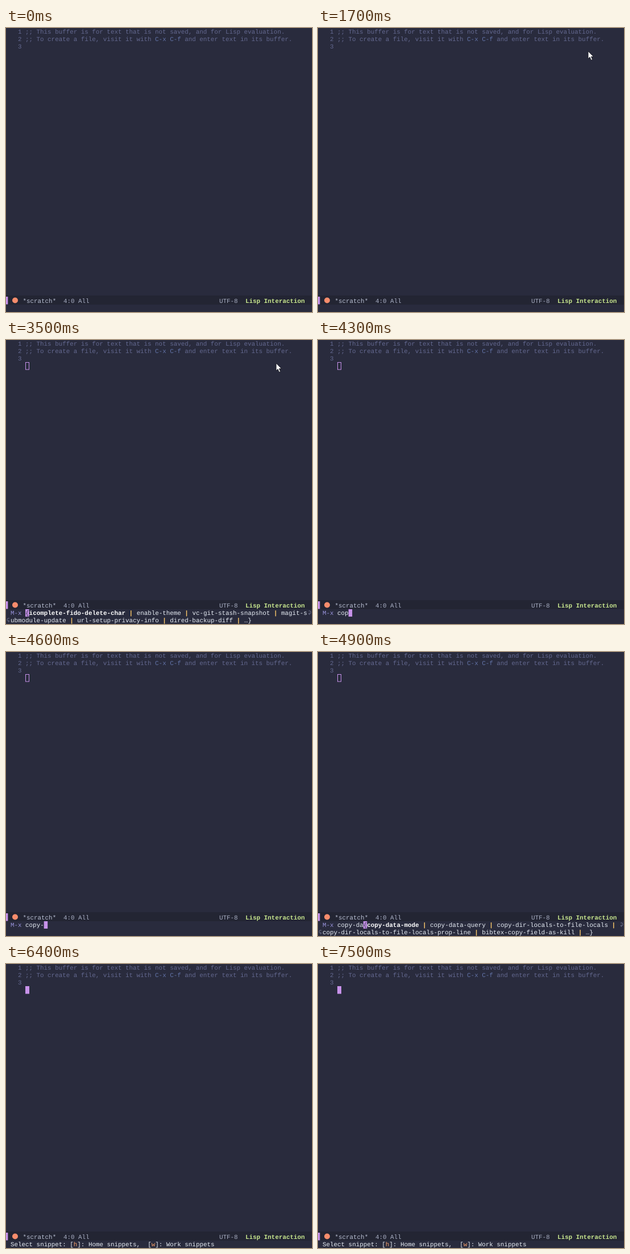
Recreate the animation shown at these times as an HTML page. Size 538 px wide and 500 px high, loop 8000 ms.

```html
<!DOCTYPE html>
<html lang="en">
<head>
<meta charset="utf-8">
<title>Editor session</title>
<style>
  html, body { margin: 0; width: 100%; height: 100%; overflow: hidden; background: #292b3d; }
  svg { display: block; }
  text {
    font: 10.87px "Liberation Mono", "Courier New", monospace;
    white-space: pre;
    text-rendering: geometricPrecision;
  }
  .bold { font-weight: bold; }
</style>
</head>
<body>
<svg id="stage" width="538" height="500" viewBox="0 0 538 500"></svg>
<script>
const LOOP = 8000, CHAR = 6.522, LEFT = 8;
const PURPLE = '#c792ea', COMMENT = '#646990', WHITE = '#e8eef6', BG = '#292b3d';
const stage = document.getElementById('stage');

const rect = (x, y, w, h, fill, extra = '') =>
  `<rect x="${x}" y="${y}" width="${w}" height="${h}" fill="${fill}" ${extra}/>`;
const text = (x, y, s, fill, cls = '') =>
  `<text x="${x}" y="${y}" fill="${fill}" class="${cls}">${s}</text>`;
const span = (s, fill, cls = '') => `<tspan fill="${fill}" class="${cls}">${s}</tspan>`;
const bars = s => s.replace(/\|/g, span('|', '#ffcb6b', 'bold'));

// Candidate lists: bold first choice, rest of the line, wrapped line
const COMMANDS = ['icomplete-fido-delete-char',
  ' | enable-theme | vc-git-stash-snapshot | magit-s',
  'ubmodule-update | url-setup-privacy-info | dired-backup-diff | …}'];
const COPIES = ['copy-data-mode',
  ' | copy-data-query | copy-dir-locals-to-file-locals |',
  'copy-dir-locals-to-file-locals-prop-line | bibtex-copy-field-as-kill | …}'];

// Prompt states: start time, typed input, hint after it, candidates
const PROMPT = [
  [3100, ''], [3500, '', '', COMMANDS],
  [3600, 'c'], [3900, 'co'], [4300, 'cop'], [4400, 'copy', '', COPIES],
  [4600, 'copy-'], [4700, 'copy-d'], [4800, 'copy-da'], [4900, 'copy-da', '', COPIES],
  [5100, 'copy-dat'], [5200, 'copy-data'], [5400, 'copy-data-'],
  [5500, 'copy-data-q', '(uery) [Matched]'],
  [5700, 'copy-data-qu', '(ery) [Matched]'],
  [5900, 'copy-data-que', '(ry) [Matched]'],
  [6000, 'copy-data-quer', '(y) [Matched]'],
  [6200, 'copy-data-query', ' [Matched]']
];

function buffer() {
  return text(21, 10, '1', COMMENT) + text(21, 23, '2', COMMENT) + text(21, 36, '3', COMMENT) +
    text(34, 10, ';; This buffer is for text that is not saved, and for Lisp evaluation.', COMMENT) +
    text(34, 23, ';; To create a file, visit it with ' + span('C-x C-f', '#6374a8') +
      ' and enter text in its buffer.', COMMENT);
}

function modeline(bottom) {
  const y = bottom - 3.3;
  return rect(0, bottom - 16, 538, 16, '#232533') + rect(0, bottom - 14, 3.4, 13.5, PURPLE) +
    `<circle cx="16" cy="${bottom - 7.5}" r="5" fill="#f78c6c"/>` +
    text(29.5, y, '*scratch*', '#b8bfd2') + text(101, y, '4:0 All', '#a9afc4') +
    text(375, y, 'UTF-8', '#a9afc4') + text(421, y, 'Lisp Interaction', '#c9e88f', 'bold');
}

function wrapMark(x, y, flip) {
  return `<path transform="translate(${x} ${y}) scale(${flip} 1)" fill="none" stroke="#686c86"
    d="M-2 -3H1Q3 0 1 2H-2M0 0L-2 2L0 4"/>`;
}

function prompt(t) {
  const [start, input, hint = '', list] = PROMPT.findLast(p => p[0] <= t);
  const y = start < 3500 ? 497 : 484;
  const x = LEFT + (4 + input.length) * CHAR;
  const tail = list ? '{' : hint;
  let out = rect(x, y - 10, 6.5, 13, PURPLE) +
    text(LEFT, y, span('M-x ', '#9a94dd') + input, WHITE) +
    text(x, y, span(tail.slice(0, 1), BG) + tail.slice(1), WHITE);
  if (list) {
    out += text(x + CHAR, y, span(list[0], '#fff', 'bold') + bars(list[1]), WHITE) +
      text(LEFT, 497, bars(list[2]), WHITE) +
      wrapMark(534, 480, 1) + wrapMark(4, 493, -1);
  }
  return out;
}

function pointer(t) {
  const [x, y] = t < 1100 ? [470, 24] : t < 1200 ? [474, 36] : [475, 41];
  return `<path transform="translate(${x} ${y})" fill="#fff" stroke="#15161f" stroke-width=".8"
    d="M0 0V13L3 10.3L5.2 15.6L7.5 14.6L5.3 9.5H9.3Z"/>`;
}

function blinkOn(t) {
  if (t >= 6400) return t < 7000 || t >= 7500;
  return t >= 2200 || (t >= 200 && t < 700) || (t >= 1200 && t < 1700);
}

function scene(t) {
  const asking = t >= 3100 && t < 6400;
  let out = rect(0, 0, 538, 500, BG) + buffer() + modeline(t >= 3500 && asking ? 474 : 487);
  if (asking) out += rect(34.5, 39.5, 6, 12.5, 'none', `stroke="${PURPLE}"`) + prompt(t);
  else if (blinkOn(t)) out += rect(34, 39, 7, 13.5, PURPLE);
  if (t >= 6400) {
    const key = k => `[${span(k, '#f7a06c')}]`;
    out += text(LEFT, 497,
      `Select snippet: ${key('h')}: Home snippets,  ${key('w')}: Work snippets`, WHITE);
  }
  if (t >= 1000 && t < 3600) out += pointer(t);
  return out;
}

let shown = '';
function draw() {
  const next = scene(performance.now() % LOOP);
  if (next !== shown) stage.innerHTML = shown = next;
  requestAnimationFrame(draw);
}
draw();
</script>
</body>
</html>
```
